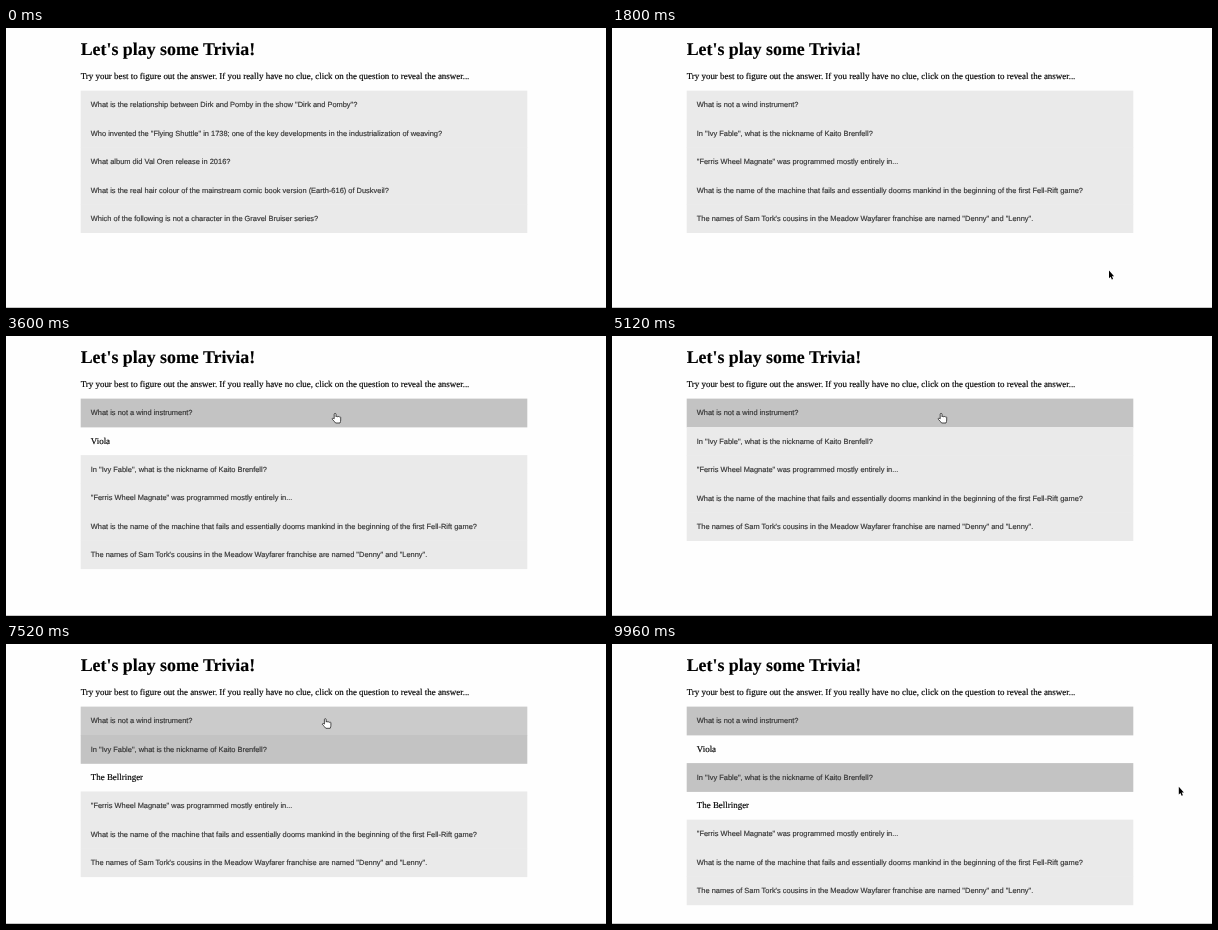
Write an HTML page that moves like this. It is 600 by 280 pixels and loops after 10000 ms.

```html
<!DOCTYPE html>
<html lang="en">
<head>
<meta charset="utf-8">
<title>Trivia</title>
<style>
  html, body { margin: 0; width: 100%; height: 100%; overflow: hidden; background: #fefefe; }
  svg { display: block; }
  text {
    font: 8.94px "Liberation Serif", "Times New Roman", serif;
    text-rendering: geometricPrecision; stroke: #000; stroke-width: .15;
  }
  .title { font-size: 17.88px; font-weight: bold; }
  .question { font: 7.44px "Liberation Sans", Arial, sans-serif; fill: #333; stroke: #333; }
</style>
</head>
<body>
<svg width="600" height="280" viewBox="0 0 600 280">
  <text class="title" x="74.7" y="26.8">Let's play some Trivia!</text>
  <text x="74.7" y="51.4">Try your best to figure out the answer. If you really have no clue, click on the question to reveal the answer...</text>
  <rect y="279" width="600" height="1" fill="#c8c8c8"/>
  <g id="list"></g>
  <path id="arrow" d="M.3 0V7.6L2 6.1L3.1 8.9L4.4 8.4L3.2 5.6H5.4Z" stroke="#fff" stroke-width=".8" paint-order="stroke"/>
  <path id="hand" d="M-1 5.4V.9a.9.9 0 0 1 1.8 0V3.4a.9.9 0 0 1 1.7.1a.9.9 0 0 1 1.6.2a.8.8 0 0 1 1.4.4V6.6Q5.5 8 4.8 9.6H.4Q-.5 8.2-2.7 6.2Q-3.5 5.3-2.7 4.9Q-2 4.6-1 5.4Z" fill="#fff" stroke="#222" stroke-width=".8"/>
</svg>
<script>
const LOOP = 10000, STEP = 40, FADE = 400;
const LEFT = 74.7, RIGHT = 521.3, TOP = 62.6, ROW = 28.4, PANEL = 28.1;
const ENTER = 280, CLEAR = 1360, RELOAD = 1800;

const firstSet = [
  'What is the relationship between Dirk and Pomby in the show "Dirk and Pomby"?',
  'Who invented the "Flying Shuttle" in 1738; one of the key developments in the industrialization of weaving?',
  'What album did Val Oren release in 2016?',
  'What is the real hair colour of the mainstream comic book version (Earth-616) of Duskveil?',
  'Which of the following is not a character in the Gravel Bruiser series?'
];
const secondSet = [
  'What is not a wind instrument?',
  'In "Ivy Fable", what is the nickname of Kaito Brenfell?',
  '"Ferris Wheel Magnate" was programmed mostly entirely in...',
  'What is the name of the machine that fails and essentially dooms mankind in the beginning of the first Fell-Rift game?',
  'The names of Sam Tork\'s cousins in the Meadow Wayfarer franchise are named "Denny" and "Lenny".'
];
const answers = ['Viola', 'The Bellringer'];

// Times at which each row flips between closed and open, or light and dark
const clicks = [[3600, 5120, 7800], [6000]];
const hovers = [[2960, 5440, 7320], [5440]];

// Pointer moves: start, end, and where it comes to rest
const home = [494, 278];
const moves = [
  { from: 240, to: 520, rest: [496.7, 242.6] },
  { from: 2360, to: 2600, rest: [547.5, 76.5] },
  { from: 2600, to: 2720, rest: [568.5, 43] },
  { from: 2720, to: 3200, rest: [329.2, 77.4] },
  { from: 5240, to: 5640, rest: [321.5, 96] },
  { from: 7280, to: 7520, rest: [319.4, 74.7] },
  { from: 8040, to: 8560, rest: [327.7, 147.6] },
  { from: 9400, to: 9680, rest: [546.5, 146.5] },
  { from: 9880, to: 9960, rest: [566.5, 142.8] }
];

const $ = id => document.getElementById(id);
const show = (el, on) => el.setAttribute('visibility', on ? 'visible' : 'hidden');
const progress = (t, from, to) => Math.min(1, Math.max(0, (t - from) / (to - from)));

function set(el, attrs) {
  for (const key in attrs) el.setAttribute(key, attrs[key]);
  return el;
}
function add(tag, attrs) {
  const el = document.createElementNS('http://www.w3.org/2000/svg', tag);
  return $('list').appendChild(set(el, attrs));
}

const rows = secondSet.map((_, i) => {
  const row = {
    box: add('rect', { x: LEFT, width: RIGHT - LEFT, height: ROW + .4 }),
    question: add('text', { class: 'question', x: 84.8 }),
    answer: add('text', { x: 84.8 })
  };
  row.answer.textContent = answers[i] || '';
  return row;
});

function pointerAt(t) {
  return moves.reduce(([x, y], { from, to, rest }) => {
    const p = progress(t, from, to), k = p * p * (3 - 2 * p);
    return [x + (rest[0] - x) * k, y + (rest[1] - y) * k];
  }, home);
}

const flips = (times = [], t) => times.filter(time => time <= t);

function darkness(i, t) {
  const past = flips(hovers[i], t);
  if (!past.length) return 0;
  const start = past[past.length - 1];
  const left = (1 - progress(t, start, start + FADE)) ** 2.2;
  return past.length % 2 ? 1 - left : left;
}

function draw(now) {
  const t = Math.floor(now % LOOP / STEP) * STEP;
  const visible = t < CLEAR || t >= RELOAD;
  const texts = t < CLEAR ? firstSet : secondSet;
  const [px, py] = pointerAt(t);
  let y = TOP, over = false;

  show($('list'), visible);
  rows.forEach(({ box, question, answer }, i) => {
    const shade = Math.round(234 - 39 * darkness(i, t));
    const open = flips(clicks[i], t).length % 2;
    set(box, { y, fill: `rgb(${shade},${shade},${shade})` });
    set(question, { y: y + 16.7 });
    question.textContent = texts[i];
    over ||= visible && px > LEFT && px < RIGHT && py >= y && py < y + ROW;
    y += ROW;
    set(answer, { y: y + 16.7, display: open ? 'inline' : 'none' });
    if (open) y += PANEL;
  });

  for (const id of ['arrow', 'hand']) {
    set($(id), { transform: `translate(${px} ${py})` });
    show($(id), t >= ENTER && over == (id == 'hand'));
  }
}

const start = performance.now();
function tick() {
  draw(performance.now() - start);
  requestAnimationFrame(tick);
}
tick();
</script>
</body>
</html>
```
